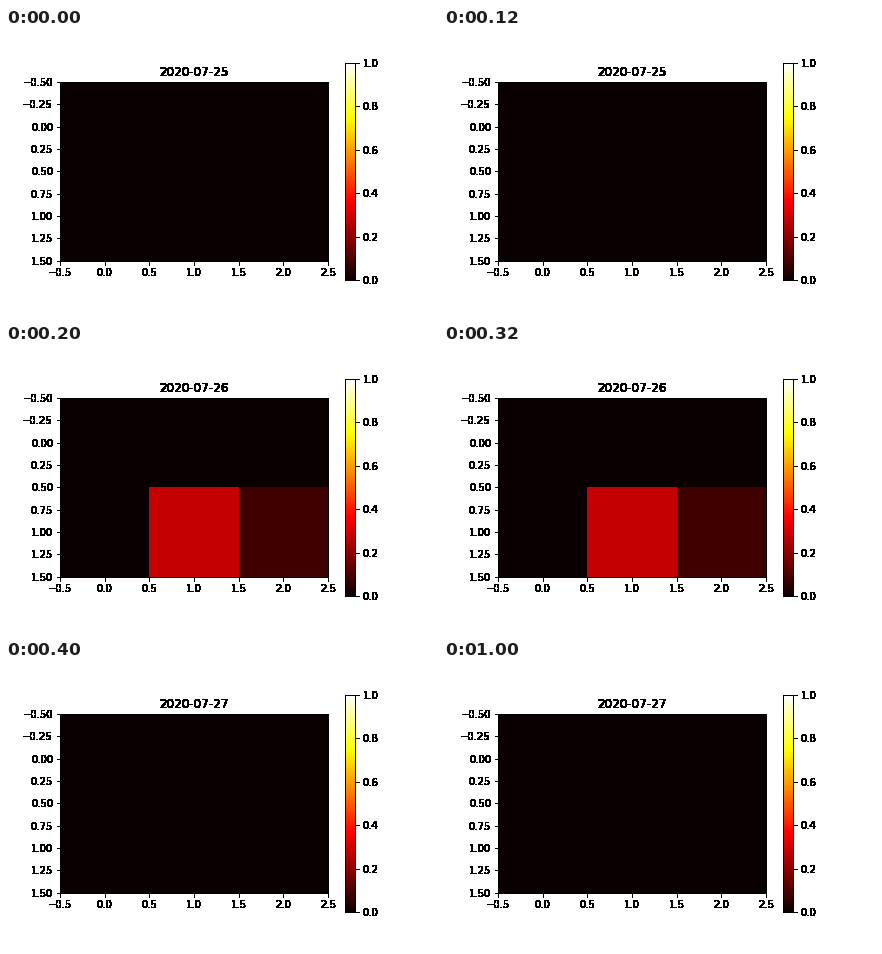
A matplotlib script that plays this animation: 432x288 px, repeating every 1400 ms.

```python
import numpy as np
import matplotlib.pyplot as plt
from matplotlib.animation import FuncAnimation
from matplotlib.lines import Line2D
from matplotlib.spines import Spine
from matplotlib.text import Text

plt.rcParams.update({"font.family": "DejaVu Sans", "font.size": 10,
                     "figure.subplot.bottom": 0.125})

STEP_MS = 200
FRAMES = 7

blank = np.zeros((2, 3))
active = np.array([[0, 0, 0], [0, 0.28, 0.08]])
days = [("2020-07-25", blank), ("2020-07-26", active), ("2020-07-27", blank)]


def harden(pixels, dpi):
    """Make every touched pixel opaque, for heavy hard-edged ink."""
    solid = np.zeros_like(pixels)
    solid[..., 3] = pixels[..., 3] > 0
    return solid, 0, 0


fig, ax = plt.subplots(figsize=(6, 4), dpi=72, facecolor="white")
image = ax.imshow(blank, cmap="hot", vmin=0, vmax=1, interpolation="nearest")
ax.set_xticks(np.arange(-0.5, 2.6, 0.5))
ax.set_yticks(np.arange(-0.5, 1.6, 0.25))
title = ax.set_title(days[0][0])
fig.colorbar(image, ax=ax, ticks=np.linspace(0, 1, 6))

fig.canvas.draw()
for ink in fig.findobj(lambda a: isinstance(a, (Text, Line2D, Spine))):
    ink.set_agg_filter(harden)


def update(i):
    # The last day is held until the loop restarts.
    date, grid = days[min(i, len(days) - 1)]
    image.set_data(grid)
    title.set_text(date)
    return image, title


anim = FuncAnimation(fig, update, frames=FRAMES, interval=STEP_MS,
                     repeat=True, repeat_delay=0, blit=False)
plt.show()
```
